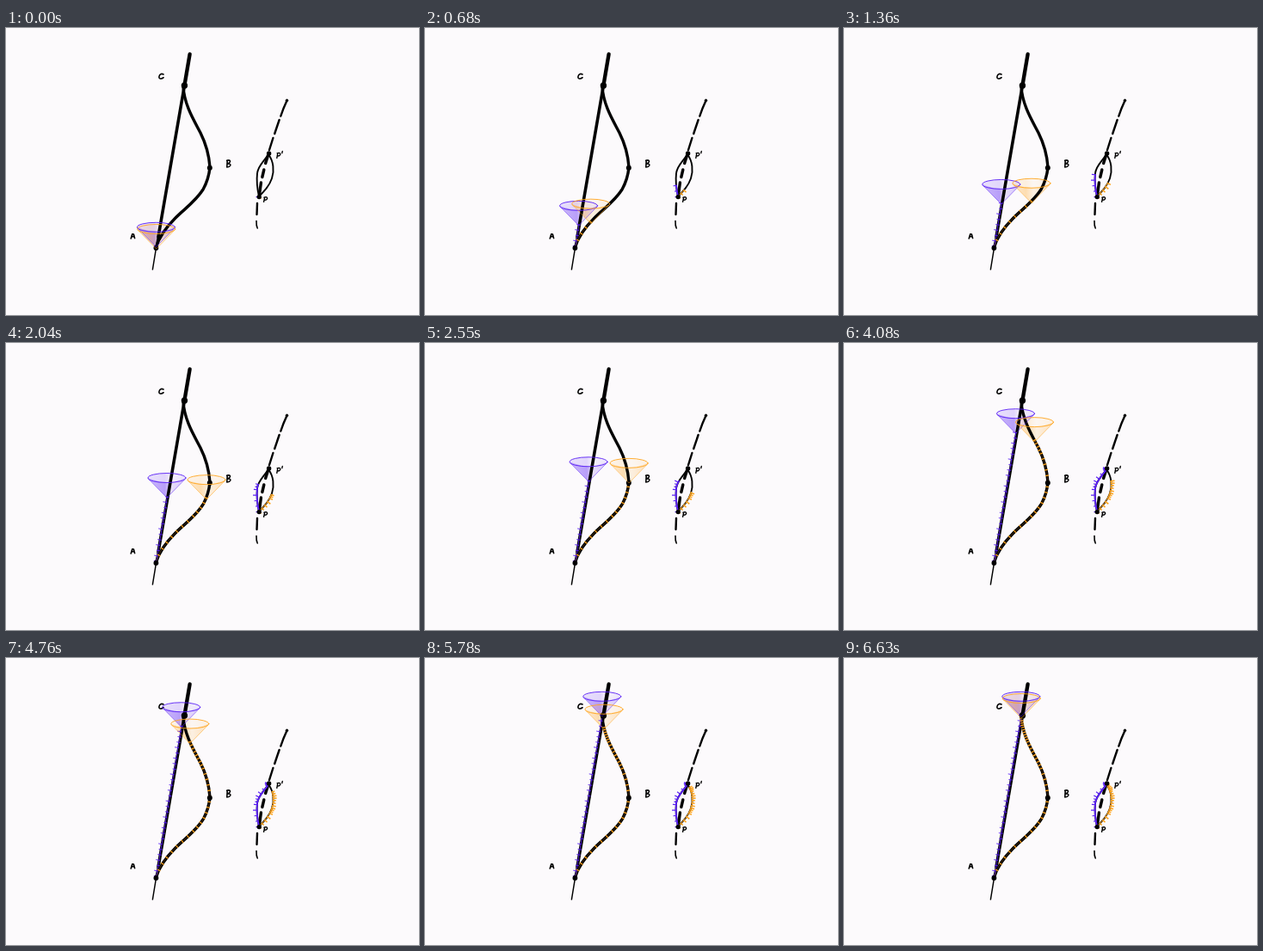
Animation, 480 px wide and 334 px high, one loop 6800 ms. Source, as an HTML page:

```html
<!DOCTYPE html>
<html lang="en">
<head>
<meta charset="utf-8">
<title>Two clocks</title>
<style>
  html, body { margin: 0; width: 100%; height: 100%; overflow: hidden; background: #fcfafc; }
  svg { display: block; width: 100%; height: 100%; fill: none; stroke-linecap: round; stroke-linejoin: round; }
  .ink { stroke: #000; }
  .dot { fill: #000; }
  .purple { stroke: #5a20f5; }
  .orange { stroke: #ffa51f; }
  .tick { stroke-linecap: butt; }
</style>
</head>
<body>
<svg viewBox="0 0 480 334">
  <defs>
    <linearGradient id="purpleFill">
      <stop offset="0" stop-color="#5a20f5" stop-opacity=".3"/>
      <stop offset=".45" stop-color="#5a20f5" stop-opacity=".42"/>
      <stop offset=".6" stop-color="#5a20f5" stop-opacity=".12"/>
      <stop offset="1" stop-color="#5a20f5" stop-opacity=".25"/>
    </linearGradient>
    <linearGradient id="orangeFill">
      <stop offset="0" stop-color="#ffa51f" stop-opacity=".2"/>
      <stop offset=".35" stop-color="#ffa51f" stop-opacity=".34"/>
      <stop offset=".55" stop-color="#ffa51f" stop-opacity=".12"/>
      <stop offset="1" stop-color="#ffa51f" stop-opacity=".3"/>
    </linearGradient>
    <g id="body">
      <path d="M-22-23Q0-13 22-23L0 0Z"/>
      <ellipse cy="-23" rx="22" ry="5.5" opacity=".4"/>
    </g>
    <g id="rim">
      <ellipse cy="-23" rx="22" ry="5.5"/>
      <path d="M-21.5-22L0 0L21.5-22" opacity=".6"/>
    </g>
  </defs>

  <use href="#body" class="purpleCone" fill="url(#purpleFill)"/>
  <use href="#body" class="orangeCone" fill="url(#orangeFill)"/>

  <g class="ink">
    <path d="M213.6 30.5L207.4 67" stroke-width="4.4"/>
    <path d="M207.4 67L177 243" stroke-width="3.6"/>
    <path d="M177 243L174.5 256" stroke-width="2.6"/>
    <path d="M174.5 256L170.4 281" stroke-width="1.5"/>
    <path id="bend" stroke-width="3.4" d="M174.5 255C178 243 186 232 197 221S220 202 229 188C234 179 236 172 237 162C236 148 232 134 226 122S207 90 206 68"/>
    <path stroke-width="2.4" d="M326.5 84.5Q322 94 319.3 102.5M317.6 107L312.2 123M310.4 128L306 142M292 204L291.5 217"/>
    <path stroke-width="3.4" d="M304.6 148L301.6 157.5M299.8 165L297.8 173.5M296.4 180L294.5 194"/>
    <path stroke-width="1.6" d="M291 224.5Q290.8 230 292.2 233"/>
    <path id="left" stroke-width="1.9" d="M294 196C292 187 291 178 292 169S300 155 305 147"/>
    <path id="right" stroke-width="1.9" d="M294 196C300 190 306 184 309 175S311 155 305 147"/>
  </g>

  <path id="line" class="purple" stroke-width=".8" d="M174.8 254L206.2 67"/>
  <path id="lineTicks" class="purple tick" stroke-width=".9"/>
  <path id="bendTrail" class="orange" stroke-width=".6" opacity=".45"/>
  <path id="bendTicks" class="orange tick" stroke-width="1.2"/>
  <path id="leftTrail" class="purple" stroke-width="1.8"/>
  <path id="leftTicks" class="purple tick" stroke-width="1.2"/>
  <path id="rightTrail" class="orange" stroke-width="1"/>
  <path id="rightTicks" class="orange tick" stroke-width="1.6"/>

  <g class="dot">
    <circle cx="207.4" cy="67" r="3.7"/>
    <circle cx="236.8" cy="162.8" r="3"/>
    <circle cx="174.4" cy="256" r="2.9"/>
    <circle cx="326.5" cy="84.3" r="1.7"/>
    <circle cx="305.6" cy="146" r="2.7"/>
    <circle cx="294.2" cy="196.6" r="2.7"/>
  </g>
  <g class="ink" stroke-width="1.6">
    <path role="img" aria-label="C" d="M183 54Q180.5 52.3 178.6 54.8Q176.8 58.2 179.4 59Q181.6 59.2 183 57.6"/>
    <path role="img" aria-label="B" d="M257.2 154L256.8 162M256.6 154.2Q261 153 260.4 155.8Q259.6 157.6 257.4 157.8Q261.4 157.8 260.8 160Q259.8 162 256.8 162"/>
    <path role="img" aria-label="A" d="M145.2 245L146.8 239.8L148.4 240L149.6 244.6M145.8 243L149 242.4"/>
    <path role="img" aria-label="P" stroke-width="1.4" d="M300.6 197.4L299.6 202.4M300 197.2Q304 196 303.6 198.6Q302.8 200.4 300.4 200.2"/>
    <path role="img" aria-label="P′" stroke-width="1.4" d="M315.8 145.9L314.8 151.3M315.2 145.7Q319.2 144.7 318.8 147.2Q318 149.2 315.4 149M321.3 143.4L320.8 145.6"/>
  </g>

  <use href="#rim" class="purpleCone purple" stroke-width=".9"/>
  <use href="#rim" class="orangeCone orange" stroke-width=".9"/>
</svg>
<script>
const STEP = 170, COUNT = 40;
const byId = id => document.getElementById(id);

// Share of each path covered at a given step.
const lineKeys = [[0, 0], [30, 1], [39, 1]];
const bendKeys = [[0, 0], [8, .324], [15, .54], [20, .695], [28, .857], [34, .94], [39, 1]];
const leftKeys = [[0, 0], [8, .48], [15, .68], [20, .95], [24, 1], [39, 1]];
const rightKeys = [[0, 0], [8, .36], [15, .5], [20, .64], [28, .82], [34, .92], [39, 1]];

function lerp(keys, k) {
  const i = Math.max(1, keys.findIndex(p => p[0] >= k));
  const [k0, v0] = keys[i - 1], [k1, v1] = keys[i];
  return v0 + (v1 - v0) * (k - k0) / (k1 - k0);
}

function pointAt(path, share) {
  return path.getPointAtLength(path.getTotalLength() * share);
}

// A tick across the path, reaching `a` to its left and `b` to its right.
function tick(path, share, a, b) {
  const p = pointAt(path, share);
  const q = pointAt(path, Math.max(0, share - .01)), r = pointAt(path, Math.min(1, share + .01));
  const d = Math.hypot(r.x - q.x, r.y - q.y) || 1;
  const nx = (q.y - r.y) / d, ny = (r.x - q.x) / d;
  return `M${p.x - nx * a} ${p.y - ny * a}L${p.x + nx * b} ${p.y + ny * b}`;
}

function reveal(trail, path, share) {
  const len = path.getTotalLength();
  trail.style.visibility = share ? "visible" : "hidden";
  trail.setAttribute("stroke-dasharray", `${len * share} ${len * 2}`);
}

const line = byId("line"), bend = byId("bend"), left = byId("left"), right = byId("right");
for (const [id, path] of [["bendTrail", bend], ["leftTrail", left], ["rightTrail", right]])
  byId(id).setAttribute("d", path.getAttribute("d"));

function ticks(id, path, keys, every, k, reach) {
  let d = "", last = -1;
  for (let i = 0; i <= k; i += every) {
    const share = lerp(keys, i);
    if (share === last) break;
    last = share;
    d += tick(path, share, ...reach(i));
  }
  byId(id).setAttribute("d", d);
}

function place(name, p, dx, dy) {
  for (const el of document.querySelectorAll(name))
    el.setAttribute("transform", `translate(${p.x + dx} ${p.y + dy})`);
}

function draw(k) {
  const a = lerp(lineKeys, k), b = lerp(bendKeys, k);
  reveal(line, line, a);
  reveal(byId("bendTrail"), bend, b);
  reveal(byId("leftTrail"), left, lerp(leftKeys, k));
  reveal(byId("rightTrail"), right, lerp(rightKeys, k));

  // The path direction is upward, so a negative normal points left on screen.
  const wobble = i => Math.sin(i * 2.4);
  ticks("lineTicks", line, lineKeys, 1, k, i => [1.6 - wobble(i) * .6, -3 - wobble(i)].map(Math.abs).reverse());
  ticks("bendTicks", bend, bendKeys, 1, k, () => [2.1, 2.1]);
  ticks("leftTicks", left, leftKeys, 2, k, i => [-1, 1].map(s => s < 0 ? .8 : 3.6 + wobble(i)).reverse());
  ticks("rightTicks", right, rightKeys, 2, k, i => [.8, 3.6 + wobble(i) * .6]);

  place(".purpleCone", pointAt(line, a), -.4, .8);
  place(".orangeCone", pointAt(bend, b), .2, 2);
}

let shown = -1;
const start = performance.now();
function frame() {
  const k = Math.floor((performance.now() - start) / STEP) % COUNT;
  if (k !== shown) draw(shown = k);
  requestAnimationFrame(frame);
}
frame();
</script>
</body>
</html>
```
